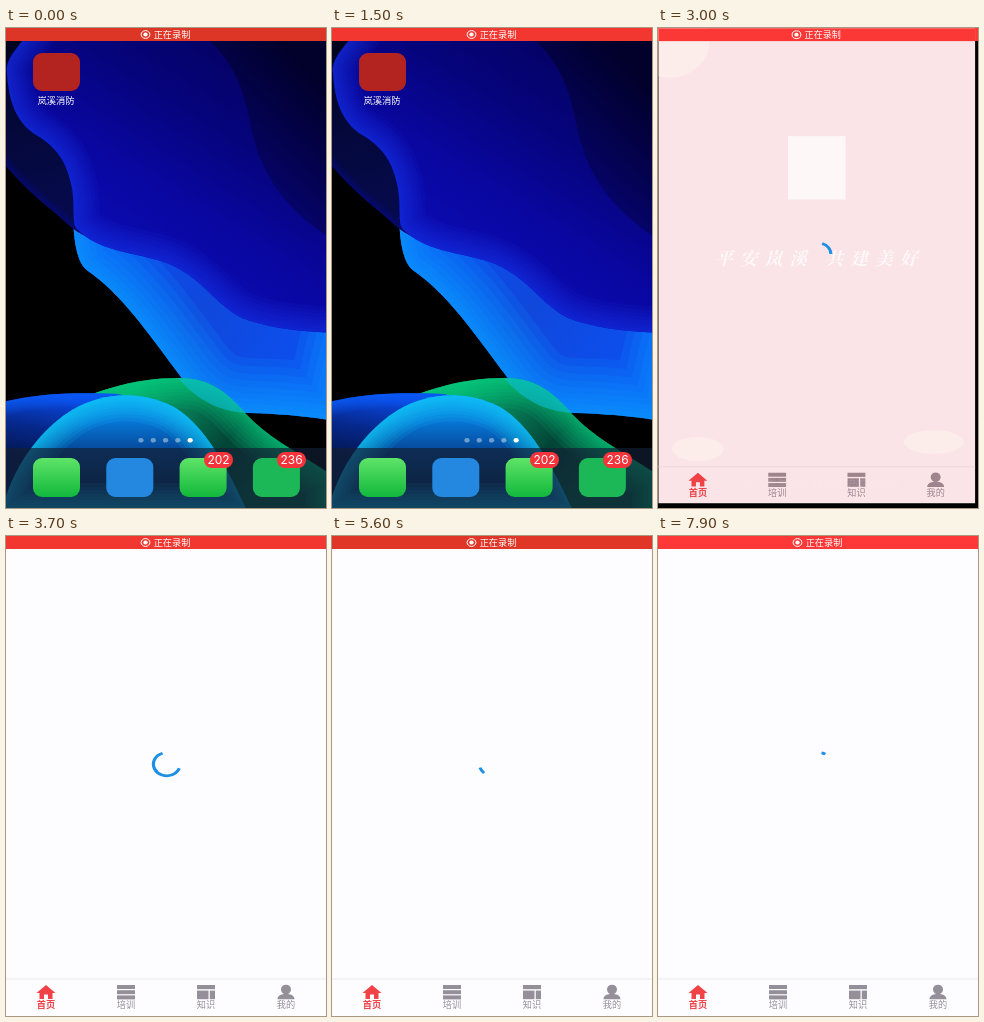
An HTML page with a canvas for the animation above (8000 ms loop, 320x480 px).

```html
<!DOCTYPE html>
<html lang="zh">
<head>
<meta charset="utf-8">
<title>启动应用</title>
<style>
html, body { margin: 0; width: 100%; height: 100%; overflow: hidden; background: #000; }
canvas { display: block; width: 320px; height: 480px; }
</style>
</head>
<body>
<canvas id="stage" width="320" height="480"></canvas>
<script>
const W = 320, H = 480, LOOP = 8000, STEP = 100;
const OPEN = 2300, OPEN_MS = 900;
const SANS = '"Noto Sans CJK SC", "Noto Sans CJK", sans-serif';
const SERIF = '"Noto Serif CJK SC", "Noto Sans CJK SC", serif';
const ctx = document.getElementById('stage').getContext('2d');

const clamp = (v, a = 0, b = 1) => Math.min(b, Math.max(a, v));
const mix = (a, b, k) => a + (b - a) * k;
const frac = v => v - Math.floor(v);

function linear(x0, y0, x1, y1, ...colors) {
  const g = ctx.createLinearGradient(x0, y0, x1, y1);
  colors.forEach((c, i) => g.addColorStop(i / (colors.length - 1), c));
  return g;
}

function fillRect(color, x, y, w, h) {
  ctx.fillStyle = color;
  ctx.fillRect(x, y, w, h);
}

function roundRect(color, x, y, w, h, r) {
  ctx.fillStyle = color;
  ctx.beginPath();
  ctx.roundRect(x, y, w, h, r);
  ctx.fill();
}

function dot(color, x, y, r, ry = r) {
  ctx.fillStyle = color;
  ctx.beginPath();
  ctx.ellipse(x, y, r, ry, 0, 0, 7);
  ctx.fill();
}

function text(str, x, y, size, color, family = SANS, style = '') {
  ctx.font = `${style} ${size}px ${family}`;
  ctx.fillStyle = color;
  ctx.textAlign = 'center';
  ctx.textBaseline = 'middle';
  ctx.fillText(str, x, y);
}

// fills an outline; a glow fades inwards from the edge over the given reach
function blob(d, fill, glow, reach = 0, strength = .15) {
  const p = new Path2D(d);
  ctx.fillStyle = fill;
  ctx.fill(p);
  if (!glow) return;
  ctx.save();
  ctx.clip(p);
  ctx.strokeStyle = glow;
  ctx.globalAlpha = strength;
  for (let i = 1; i <= 10; i++) {
    ctx.lineWidth = 2 * reach * (i / 10) ** 1.5;
    ctx.stroke(p);
  }
  ctx.restore();
}

function wallpaper() {
  fillRect('#000', 0, 0, W, H);
  // bright sheet, lit along its lower left edge
  blob('M68 150 C66 190 66 232 82 243 C115 266 140 302 172 345 C195 377 215 384 243 385 C275 386 300 388 330 393 L400 100 Z',
    linear(90, 210, 300, 360, '#0a4cf0', '#1048dc', '#0c50f0'), '#0c9cff', 55, .14);
  // navy sheet on the left
  blob('M-40 -40 L90 -40 L90 212 C70 206 62 196 48 184 C28 168 14 154 -1 137 L-40 100 Z',
    linear(0, 20, 50, 190, '#02041e', '#04083c', '#060a4c'), '#0c1488', 8, .08);
  // main blue sheet
  const blue = 'C60 2 -4 14 1 46 C3 74 10 92 27 105 C52 119 61 135 66 160 C69 180 66 194 70 200 C92 224 128 224 158 234 C196 248 208 276 236 290 C262 300 290 303 330 305 L460 305 L460 -120 Z';
  blob('M60 -120 ' + blue, linear(110, 230, 240, 20, '#0b0cb4', '#0907a0', '#06047c', '#040262'),
    '#1830e0', 26, .1);
  // dark fold at the upper right
  blob('M186 0 C228 26 238 62 246 104 C258 156 288 186 321 208 L321 0 Z',
    linear(225, 130, 310, 50, 'rgba(4,2,74,.45)', 'rgba(1,0,36,.9)'));
  // green hump
  blob('M30 395 C80 362 130 350 172 350 C206 350 222 366 240 386 C262 410 292 424 330 450 L330 540 L30 540 Z',
    linear(130, 360, 250, 460, '#08a468', '#067a54', '#034436', '#045c40'), '#06cc80', 30, .11);
  // where the bright sheet shows through
  blob('M172 350 C206 350 222 366 240 385 C222 384 196 378 172 350 Z', 'rgba(10,190,215,.6)');
  // blue hump on the left
  blob('M-60 400 C-20 372 30 362 112 366 L160 380 L150 540 L-60 540 Z',
    linear(30, 366, 20, 430, '#0a48e0', '#06288c', '#031650'), '#1068ff', 14, .1);
  // cyan hump
  blob('M-4 481 C10 430 40 398 66 382 C98 363 136 363 166 378 C192 392 214 424 240 481 Z',
    linear(110, 364, 110, 450, '#0890f0', '#0878d8', '#054a9c', '#033470'), '#10c8f0', 26, .12);
}

function badge(str, x) {
  roundRect('#f5333a', x, 424, 29, 16, 8);
  text(str, x + 14.5, 432.5, 12, '#fff', 'Inter, sans-serif');
}

function home(t) {
  wallpaper();
  roundRect('#b3231f', 27, 25, 47, 38, 9);
  if (t >= 2000) roundRect('rgba(0,0,0,.4)', 27, 25, 47, 38, 9);
  text('岚溪消防', 50, 72, 9.3, '#fff', SANS, '500');
  for (let i = 0; i < 5; i++) {
    dot(i === 4 ? '#fff' : 'rgba(255,255,255,.42)', 135 + i * 12.3, 412.3, 2.6, 2.3);
  }
  fillRect('rgba(18,32,52,.68)', 0, 420, W, 60);
  const green = linear(0, 430, 0, 469, '#5ee468', '#12b83c');
  [green, '#2488e0', green, '#1cb858'].forEach((c, i) => {
    roundRect(c, 27 + i * 73.3, 430, 47, 39, 9);
  });
  badge('202', 198);
  badge('236', 271);
}

function statusBar(t) {
  const k = .5 + .5 * Math.cos((t - 2550) / 5300 * Math.PI * 2);
  fillRect(`rgb(${mix(222, 253, k)},${mix(54, 56, k)},${mix(38, 54, k)})`, 0, 0, W, 13);
  ctx.strokeStyle = '#fff';
  ctx.lineWidth = 1;
  ctx.beginPath();
  ctx.ellipse(139.5, 6.5, 4.4, 3.9, 0, 0, 7);
  ctx.stroke();
  dot('#fff', 139.5, 6.5, 2.2, 1.9);
  text('正在录制', 166, 6.5, 9.2, '#fff');
}

function tabBar() {
  const red = '#ef4348', gray = '#948f98';
  fillRect('#ececf0', 0, 442.5, W, 1);
  blob('M40 449 L49.5 457 L46.5 457 L46.5 463 L42 463 L42 458.5 L38 458.5 L38 463 L33.5 463 L33.5 457 L30.5 457 Z', red);
  for (let i = 0; i < 3; i++) fillRect(gray, 111, 449 + i * 5.2, 18, 4);
  fillRect(gray, 191, 449, 18, 4.2);
  fillRect(gray, 191, 454.6, 11.5, 8.6);
  fillRect(gray, 203.8, 454.6, 5.2, 8.6);
  dot(gray, 280, 453.5, 5, 4.8);
  blob('M271.5 463.3 C271.5 459 276 458.4 280 457.5 C284 458.4 288.5 459 288.5 463.3 Z', gray);
  ['首页', '培训', '知识', '我的'].forEach((s, i) => {
    text(s, 40 + i * 80, 469, 9.2, i ? gray : red, SANS, i ? '' : 'bold');
  });
}

// cubic-bezier(.4, 0, .2, 1)
function fastOutSlowIn(x) {
  x = clamp(x);
  let lo = 0, hi = 1, s = .5;
  for (let i = 0; i < 18; i++) {
    s = (lo + hi) / 2;
    const bx = 1.2 * s * (1 - s) ** 2 + .6 * s * s * (1 - s) + s ** 3;
    if (bx < x) lo = s; else hi = s;
  }
  return 3 * s * s * (1 - s) + s ** 3;
}

function spinner(t) {
  const lead = 1 - clamp((t - 3000) / 600);
  const phase = frac(.67 + (t - 4600) / 2350 + .14 * lead);
  const head = fastOutSlowIn(phase * 2), tail = fastOutSlowIn(phase * 2 - 1);
  const turn = .403 + (t - 4600) / 5400;
  const start = -90 + 270 * tail + 90 * phase + 360 * turn - 30 * lead;
  const sweep = Math.max(270 * (head - tail), 2);
  const rad = Math.PI / 180;
  ctx.save();
  ctx.translate(160.8, 228.2);
  ctx.scale(1, .86);
  ctx.strokeStyle = '#1d90e4';
  ctx.lineWidth = 3.2;
  ctx.beginPath();
  ctx.arc(0, 0, 13.4, start * rad, (start + sweep) * rad);
  ctx.stroke();
  ctx.restore();
}

function splash(alpha) {
  const pale = 'rgba(255,255,240,.6)';
  ctx.save();
  ctx.globalAlpha = alpha;
  fillRect('#e2383e', 0, 13, W, H - 13);
  ctx.globalAlpha = Math.min(1, alpha * 4);
  dot(pale, 12, 12, 40, 38);
  dot(pale, 40, 425, 26, 12);
  dot(pale, 278, 418, 30, 12);
  ctx.globalAlpha = Math.min(1, alpha * 6);
  fillRect('#fff', 131, 109, 58, 64);
  ctx.letterSpacing = '7px';
  text('平安岚溪 共建美好', 163, 232, 18, '#fff', SERIF, 'italic bold');
  ctx.letterSpacing = '0px';
  ctx.globalAlpha = alpha;
  text('人人参与安全 共同守护美好家园', 165, 460, 11, '#fff');
  ctx.restore();
}

function page(t) {
  fillRect('#fdfcff', 0, 0, W, H);
  const cover = clamp((3055 - t) / 455);
  tabBar();
  if (cover > 0) splash(cover);
  if (t >= 2700) spinner(t);
  statusBar(t);
}

function draw(t) {
  const p = clamp((t - OPEN) / OPEN_MS);
  const k = 1 - (1 - p) ** 3;
  if (p < 1) {
    home(t);
    if (p > 0) fillRect(`rgba(0,0,0,${k})`, 0, 0, W, H);
    statusBar(t);
  }
  if (p > 0) {
    const w = mix(47, W, k), h = mix(38, H, k);
    ctx.save();
    ctx.translate(mix(27, 0, k), mix(25, 0, k));
    ctx.beginPath();
    ctx.roundRect(0, 0, w, h, 9 * (1 - k));
    ctx.clip();
    ctx.scale(w / W, h / H);
    page(t);
    ctx.restore();
  }
}

const began = performance.now();
function tick() {
  const t = (performance.now() - began) % LOOP;
  draw(Math.floor(t / STEP) * STEP);
  requestAnimationFrame(tick);
}
tick();
</script>
</body>
</html>
```
